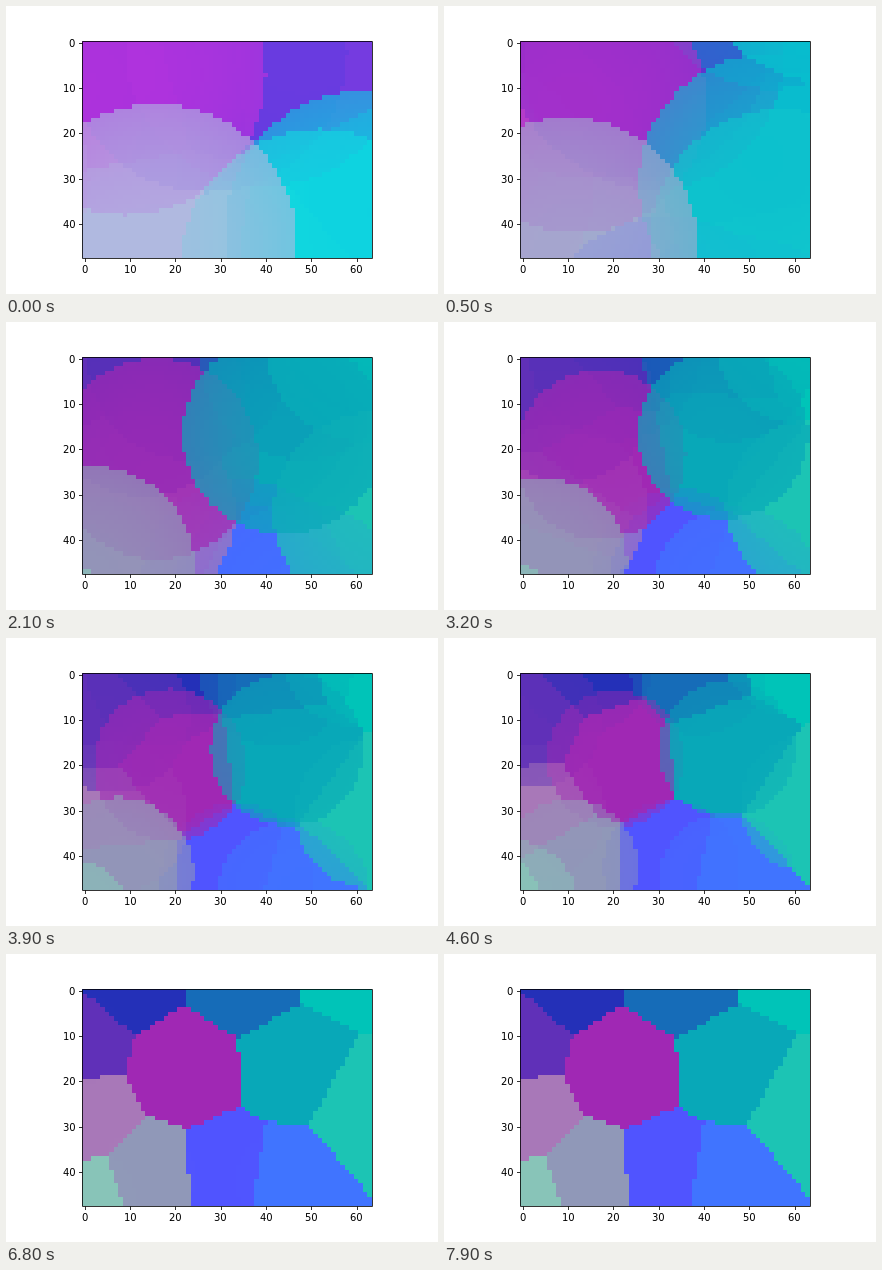
Recreate the animation shown at these times as an HTML page with a canvas. Size 432x288 px, loop 8000 ms.

```html
<!DOCTYPE html>
<html lang="en">
<head>
<meta charset="utf-8">
<title>Colour map</title>
<style>
  html, body { margin: 0; width: 100%; height: 100%; overflow: hidden; background: #fff; }
  canvas, svg { position: absolute; display: block; }
  canvas { left: 76px; top: 35px; width: 290px; height: 217px; image-rendering: pixelated; }
  svg { left: 0; top: 0; }
  path { fill: none; stroke: #000; stroke-width: .8; }
  text { font: 10px "DejaVu Sans", sans-serif; }
</style>
</head>
<body>
<canvas id="map" width="64" height="48"></canvas>
<svg id="axes" width="432" height="288" viewBox="0 0 432 288"></svg>
<script>
const COLS = 64, ROWS = 48, STEP = 100, STEPS = 80;
const ctx = document.getElementById('map').getContext('2d');
const image = ctx.createImageData(COLS, ROWS);

const mix = (a, b, u) => a + (b - a) * u;
const clamp = v => Math.min(1, Math.max(0, v));
const smooth = v => { const u = clamp(v); return u * u * (3 - 2 * u); };
const easeOut = v => 1 - (1 - clamp(v)) ** 2;

// Every colour drifts from its start over a turning point to its home.
const disc = (hex, start, turn, home) => ({
  rgb: [1, 3, 5].map(i => parseInt(hex.slice(i, i + 2), 16)), start, turn, home
});

// Painted from bottom to top.
const discs = [
  disc('#5054ff', [30, 80], [35, 49], [32, 40]),
  disc('#4074ff', [48, 84], [48, 54], [44, 42]),
  disc('#a878b8', [-30, 30], [11, 34], [0, 28.5]),
  disc('#2430b8', [27, 2], [23, 0], [9.7, -3.4]),
  disc('#6030b8', [40, .5], [13, 8], [-2, 10.5]),
  disc('#166cb8', [60, -32], [48, 0], [35, -2.5]),
  disc('#a028b4', [9, 7], [16, 22], [22.5, 17]),
  disc('#00c4b8', [70, -32], [62, -4], [58, -7]),
  disc('#1cc4b4', [52, 50], [64, 34], [62.7, 26]),
  disc('#08a8b8', [62, 41.5], [44, 16.5], [45.7, 16.3]),
  disc('#9098b8', [16, 44.5], [2, 46], [14, 41]),
  disc('#88c4b8', [-12, 80], [-10, 66], [.6, 45.6])
];

function paint(t) {
  const out = easeOut(t / 2.1), back = smooth((t - 2.1) / 3.9);
  const radius = 31 * Math.exp(-.157 * t);
  const weight = .78 + .02 * t, fade = .24 * (1 - t / 8);
  const gain = 1 + .22 * clamp(1 - t / 1.1);
  const settled = smooth((t - 2.4) / 4.8);

  const live = discs.map(({ rgb, start, turn, home }) => {
    const [x, y] = home.map((end, i) => mix(mix(start[i], turn[i], out), end, back));
    return { x, y, rgb: rgb.map(v => Math.min(255, v * gain)) };
  });

  for (let y = 0, p = 0; y < ROWS; y++) {
    for (let x = 0; x < COLS; x++, p += 4) {
      const dist = live.map(d => (x - d.x) ** 2 + (y - d.y) ** 2);
      const owner = live[dist.indexOf(Math.min(...dist))].rgb;
      const color = owner.slice();
      live.forEach(({ rgb }, i) => {
        const q = dist[i] / radius ** 2;
        if (q > 1) return;
        const w = weight * (1 - fade * q);
        for (let c = 0; c < 3; c++) color[c] = mix(color[c], rgb[c], w);
      });
      // Overlaps give way to the nearest colour as the map settles.
      for (let c = 0; c < 3; c++) image.data[p + c] = mix(color[c], owner[c], settled);
      image.data[p + 3] = 255;
    }
  }
  ctx.putImageData(image, 0, 0);
}

function drawAxes() {
  const cell = 4.53, left = 76.44, top = 34.56, digit = 6.36;
  const snap = v => Math.floor(v + .5) + .5;
  const label = (n, x, y) => `<text x="${Math.round(x)}" y="${Math.round(y)}">${n}</text>`;
  let path = 'M76.5 35.5H366.5V252.5H76.5Z', labels = '';
  for (let n = 0; n < COLS; n += 10) {
    const width = digit * String(n).length;
    const x = left + (n + .5) * cell, y = top + (n + .5) * cell;
    path += `M${snap(x)} 252.5v3.5`;
    labels += label(n, x - width / 2, 267);
    if (n >= ROWS) continue;
    path += `M76.5 ${snap(y)}h-3.5`;
    labels += label(n, left - 7 - width, y + 4);
  }
  document.getElementById('axes').innerHTML = `<path d="${path}"/>${labels}`;
}

const start = performance.now();
let shown = -1;
function tick() {
  const step = Math.floor((performance.now() - start) / STEP) % STEPS;
  if (step !== shown) paint((shown = step) * STEP / 1000);
  requestAnimationFrame(tick);
}

drawAxes();
tick();
</script>
</body>
</html>
```
